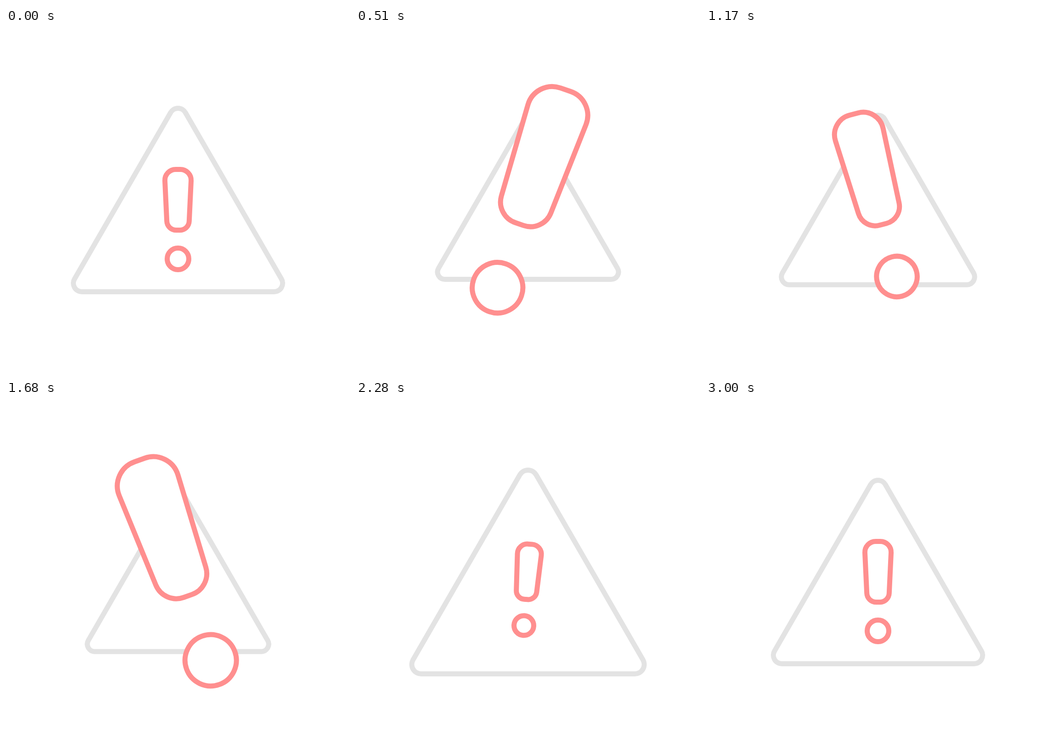
An HTML page for the animation above (5030 ms loop, 748 by 748 pixels).

```html
<!DOCTYPE html>
<html lang="en">
<head>
<meta charset="utf-8">
<title>Warning</title>
<style>
  html, body { margin: 0; width: 100%; height: 100%; overflow: hidden; background: #fff; }
  svg { display: block; width: 100%; height: 100%; }
  path, circle { fill: #fff; stroke-width: 11; vector-effect: non-scaling-stroke; }
  #triangle { stroke: #e3e3e3; }
  #mark { stroke: #ff8f8f; }
</style>
</head>
<body>
<svg viewBox="-374 -374 748 748">
  <path id="triangle" d="M-209 199.5 A18.5 18.5 0 0 1 -225 171.75 L-16 -190.25
    A18.5 18.5 0 0 1 16 -190.25 L225 171.75 A18.5 18.5 0 0 1 209 199.5 Z"/>
  <g id="mark">
    <path d="M-5 -66.5 H5 A23.5 23.5 0 0 1 28.5 -41.9 L24.3 46.2 A20.3 20.3 0 0 1 4 65.5
      H-4 A20.3 20.3 0 0 1 -24.3 46.2 L-28.5 -41.9 A23.5 23.5 0 0 1 -5 -66.5 Z"/>
    <circle cy="128" r="23.5"/>
  </g>
</svg>
<script>
  const LOOP = 5030, STEP = 30, END = 3000, DRIFT_LEAD = 60;

  const smooth = x => x * x * (3 - 2 * x);
  const smoother = x => x * x * x * (x * (6 * x - 15) + 10);

  // Every track overshoots, swings back and comes to rest on the same beats.
  const settle = (over, back, rest) => [[2210, over], [2610, back], [END, rest]];

  // Eases through [time, value] keys.
  const track = (ease, keys) => time => {
    const next = keys.findIndex(([at]) => at > time);
    if (next < 0) return keys[keys.length - 1][1];
    const [t0, v0] = keys[next - 1], [t1, v1] = keys[next];
    return v0 + (v1 - v0) * ease((time - t0) / (t1 - t0));
  };

  const size = track(smooth, [[0, 1], [390, .854], [960, .947], [1600, .854], ...settle(1.123, .97, 1)]);
  const lift = track(smooth, [[0, 0], [430, 1], [930, .185], [1390, 1], [1620, 1], ...settle(-.07, .03, 0)]);
  const lean = track(smoother, [[0, 0], [460, 19], [1440, -20], [1600, -20], ...settle(4.7, -2, 0)]);

  const triangle = document.getElementById('triangle');
  const mark = document.getElementById('mark');

  // The mark grows and rises with its lift; its sideways drift runs slightly ahead of its lean.
  function draw(time) {
    const t = Math.floor(time / STEP) * STEP;
    const rise = 97 * Math.max(0, lift(t)) ** .8;
    const drift = rise * Math.tan(lean(t + DRIFT_LEAD) * Math.PI / 180);
    triangle.setAttribute('transform', `scale(${size(t)})`);
    mark.setAttribute('transform',
      `translate(${drift} ${-rise}) rotate(${lean(t)}) scale(${1 + 1.42 * lift(t)})`);
  }

  const start = performance.now();
  function tick() {
    draw((performance.now() - start) % LOOP);
    requestAnimationFrame(tick);
  }
  tick();
</script>
</body>
</html>
```
